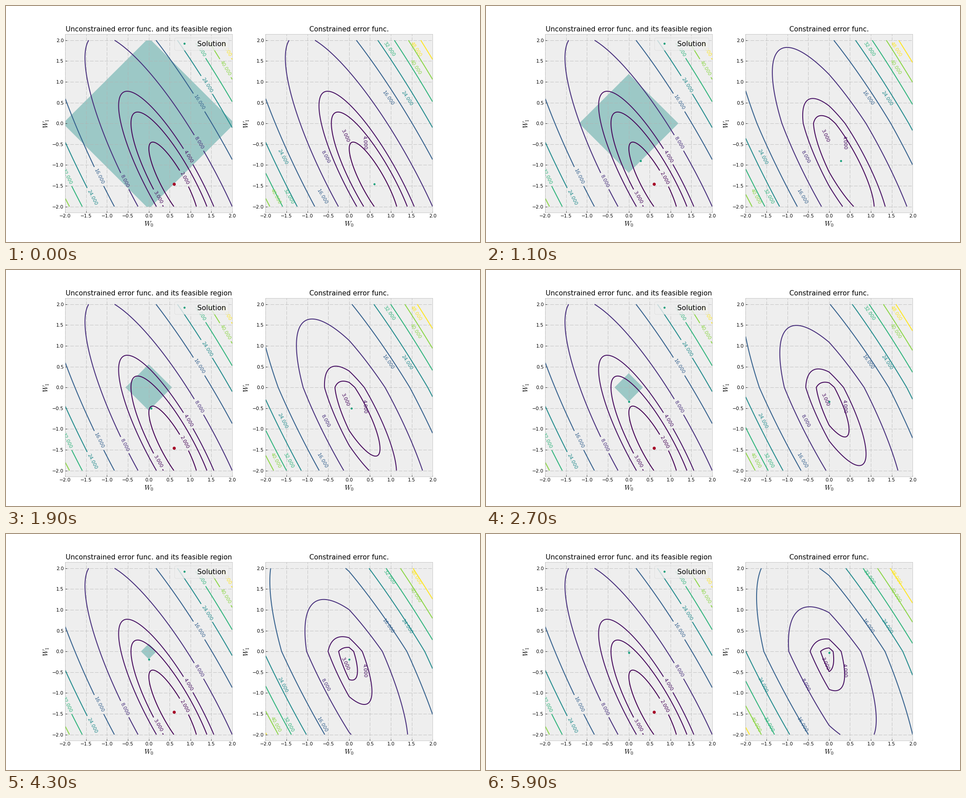
A matplotlib script that plays this animation: 1058x529 px, repeating every 6 s.

```python
import matplotlib.pyplot as plt
import numpy as np
from matplotlib.animation import FuncAnimation
from matplotlib.patches import Polygon, Rectangle

W, H, DPI = 1058, 529, 72
FRAMES, INTERVAL = 60, 100
LEVELS = [2, 3, 4, 8, 16, 24, 32, 40, 48]
LAMBDAS = np.linspace(0, 2, FRAMES)
BEST_X, BEST_Y = 0.6, -1.457
CURVE, BASE = 0.505, 1.487
GREEN, RED, TEAL = "#109e78", "#a60628", "#21908c"

plt.style.use("bmh")
plt.rcParams.update({
    "font.family": "DejaVu Sans", "font.size": 10.6,
    "axes.titlesize": "x-large", "axes.labelsize": "x-large",
    "grid.linewidth": 0.7, "grid.linestyle": (0, (8, 3)),
    "lines.scale_dashes": False,
})

axis = np.linspace(-2, 2, 201)
X, Y = np.meshgrid(axis, axis)
ERROR = 5 * (X - BEST_X + 0.5 * (Y - BEST_Y)) ** 2 + CURVE * (Y - BEST_Y) ** 2 + BASE
L1 = np.abs(X) + np.abs(Y)


def solve(lam):
    """Minimum of the error plus lam times the L1 norm."""
    dy = 1.5 * lam / (2 * CURVE)
    x = BEST_X - lam / 10 - dy / 2
    if x < 0:
        x = 0
        dy = (lam + 5 * BEST_X) / (2.5 + 2 * CURVE)
    return x, BEST_Y + dy


def style_axes(ax, title):
    ticks = np.arange(-2, 2.1, 0.5)
    ax.set(xlim=(-2, 2), ylim=(-2.143, 2.143), xticks=ticks, yticks=ticks,
           title=title, xlabel="$W_0$", ylabel="$W_1$")


def draw_contour(ax, values):
    return ax.contour(X, Y, values, LEVELS, cmap="viridis", vmin=2, vmax=48,
                      linewidths=2, zorder=2)


def crossings(values, rows, end):
    """Points where contours cross a row; end is 0 for the left side, -1 for the right."""
    for y, levels in rows.items():
        line = values[np.abs(axis - y).argmin()]
        for level in levels:
            yield axis[np.flatnonzero(line <= level)[end]], y


def add_labels(contour, values, left_rows, right_rows, inline):
    points = [*crossings(values, left_rows, 0), *crossings(values, right_rows, -1)]
    contour.clabel(fmt="%1.3f", inline=inline, manual=points)


fig, (left, right) = plt.subplots(
    1, 2, figsize=(W / DPI, H / DPI), dpi=DPI, facecolor="white",
    gridspec_kw=dict(left=0.125, right=0.9, bottom=0.125, top=0.88, wspace=0.2))
style_axes(left, "Unconstrained error func. and its feasible region")
style_axes(right, "Constrained error func.")

add_labels(draw_contour(left, ERROR), ERROR,
           {-1.27: (16, 32), -1.38: (8,), -1.77: (3, 24)},
           {1.78: (32, 48), 1.33: (40,), 0.92: (24,), 0.5: (16,),
            -0.47: (8,), -0.8: (4,), -1.33: (2,)}, True)

# The labels on the right stay where the strongest penalty puts them.
penalised = ERROR + LAMBDAS[-1] * L1
strongest = draw_contour(right, penalised)
add_labels(strongest, penalised,
           {-0.29: (3,), -0.8: (8, 24), -1.75: (16, 32, 40)},
           {1.78: (32, 48), 1.34: (40,), 0.6: (16, 24), -0.46: (4,)}, False)
strongest.set_visible(False)

diamond = left.add_patch(Polygon(np.zeros((4, 2)), facecolor=TEAL, alpha=0.4,
                                 linewidth=0, zorder=1))
diamond.set_clip_path(Rectangle((-2, -2), 4, 4, transform=left.transData))
dots = [ax.plot([], [], "o", color=GREEN, ms=4.5, mew=0, zorder=3, label="Solution")[0]
        for ax in (left, right)]
left.plot(BEST_X, BEST_Y, "o", color=RED, ms=7, mew=0, zorder=4)
left.legend(handles=dots[:1], loc="upper right", fontsize=15.7)

current = []


def update(frame):
    lam = LAMBDAS[frame]
    x, y = solve(lam)
    t = abs(x) + abs(y)
    diamond.set_xy([(t, 0), (0, t), (-t, 0), (0, -t)])
    for dot in dots:
        dot.set_data([x], [y])
    while current:
        current.pop().remove()
    current.append(draw_contour(right, ERROR + lam * L1))
    return []


anim = FuncAnimation(fig, update, frames=FRAMES, interval=INTERVAL,
                     init_func=lambda: [], repeat=True, repeat_delay=0)
plt.show()
```
